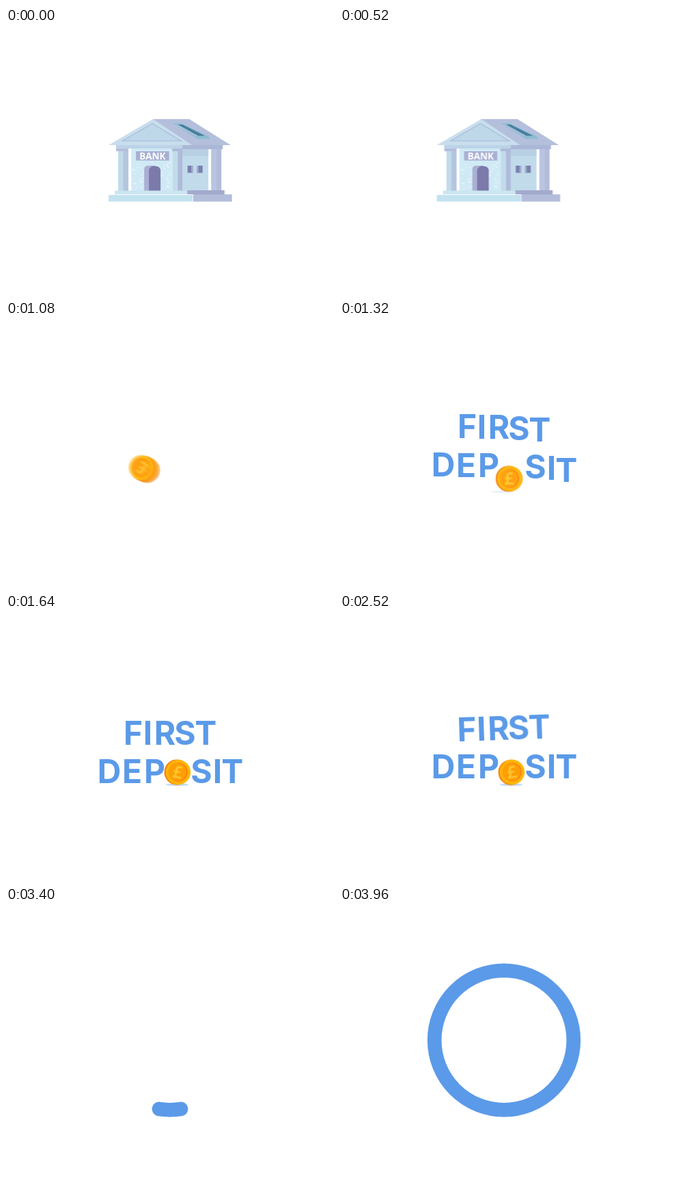
Animation of 480x387 px, one loop 4400 ms. Source, as an HTML page:

```html
<!DOCTYPE html>
<html lang="en">
<head>
<meta charset="utf-8">
<title>First deposit</title>
<style>
html, body { margin: 0; width: 100%; height: 100%; overflow: hidden; background: #fff; }
svg { display: block; width: 100%; height: 100%; }

/* One shared 4400 ms loop: 1% = 44 ms */
.bank, .cx, .cy, .spin, .trail, .solid, .letter, .line, .shadow, .ring {
  animation: 4400ms linear var(--lag, 0ms) infinite both;
}
.bank { animation-name: bank; }
.cx { animation-name: coin-x; }
.cy { animation-name: coin-y; }
.spin { animation-name: coin-spin; }
.trail { animation-name: trail; }
.solid { animation-name: solid; }
.letter { animation-name: rise; }
.line { animation-name: leave; transform-origin: 240px 190px; }
.tilt { --tilt: -2deg; }
.shadow { animation-name: shadow; }
.ring { animation-name: ring; }

.letter {
  font: 700 48px Inter, "Open Sans", sans-serif;
  text-anchor: middle;
  fill: #5b9ae8;
}
.sign { font: 700 13.6px "Open Sans", "Noto Sans", sans-serif; text-anchor: middle; fill: #fff; }
.pound { font: 700 25px "Noto Sans", "Open Sans", sans-serif; text-anchor: middle; }

@keyframes bank {
  0%, 10% { transform: none; animation-timing-function: ease-in-out; }
  16.36% { transform: translateX(-49px); animation-timing-function: cubic-bezier(.5, 0, .85, .5); }
  21.1%, 100% { transform: translateX(335px); }
}
@keyframes coin-x {
  0%, 17.27% { transform: translateX(-30px); animation-timing-function: cubic-bezier(.33, 1, .68, 1); }
  33.64%, 68.18% { transform: translateX(251px); animation-timing-function: ease-in-out; }
  73.64%, 100% { transform: translateX(240px); }
}
@keyframes coin-y {
  0%, 17.27% { transform: translateY(106px); animation-timing-function: cubic-bezier(.27, 1, .57, 1); }
  33.64%, 61.82% { transform: translateY(231px); animation-timing-function: ease-out; }
  68.18% { transform: translateY(224.5px); animation-timing-function: cubic-bezier(.33, 0, .67, .33); }
  73.64%, 100% { transform: translateY(296.5px); }
}
@keyframes coin-spin {
  0%, 17.27% { transform: rotate(-850deg); animation-timing-function: cubic-bezier(.33, 1, .68, 1); }
  33.64%, 50% { transform: rotate(0deg); animation-timing-function: ease-in-out; }
  57.27% { transform: rotate(-18deg); animation-timing-function: ease-in-out; }
  64%, 68.18% { transform: rotate(0deg) scale(1); animation-timing-function: ease-in; }
  72.7% { opacity: 1; }
  73.64%, 100% { transform: rotate(0deg) scale(.55); opacity: 0; }
}
/* Motion blur: faint copies while fast, one solid shape otherwise */
@keyframes trail {
  0%, 17% { opacity: 0; }
  17.01%, 31% { opacity: .38; }
  31.01%, 100% { opacity: 0; }
}
@keyframes solid {
  0%, 30.8% { opacity: 0; }
  30.81%, 100% { opacity: 1; }
}
@keyframes rise {
  0%, 25% { transform: translateY(62px); animation-timing-function: cubic-bezier(.3, .6, .5, 1); }
  30% { transform: translateY(-20px); animation-timing-function: ease-in-out; }
  33.4% { transform: translateY(1px); animation-timing-function: ease-in-out; }
  35%, 100% { transform: none; }
}
@keyframes leave {
  0%, 50% { transform: translateY(0) rotate(0deg); animation-timing-function: ease-in; }
  57.27% { transform: translateY(-7px) rotate(var(--tilt, 0deg)); animation-timing-function: ease-out; }
  59.77% { transform: translateY(-18px) rotate(var(--tilt, 0deg)); animation-timing-function: ease-in; }
  65%, 100% { transform: translateY(64px) rotate(0deg); }
}
@keyframes shadow {
  0%, 29% { opacity: 0; transform: translateX(-20px); animation-timing-function: ease-out; }
  33.64%, 61.82% { opacity: 1; transform: none; }
  65.5%, 100% { opacity: 0; transform: none; }
}
@keyframes ring {
  0%, 73.1% { opacity: 0; stroke-dashoffset: 99.9; }
  73.64% { opacity: 1; stroke-dashoffset: 99.9; animation-timing-function: cubic-bezier(.333, 0, .667, .333); }
  90%, 100% { opacity: 1; stroke-dashoffset: 0; }
}
</style>
</head>
<body>
<svg viewBox="0 0 480 387" preserveAspectRatio="none">
  <defs>
    <g id="coin">
      <circle cx="-.9" r="18.6" fill="#f58210"/>
      <circle cx="1" cy=".2" r="18.2" fill="#ffb508"/>
      <circle cx="1" r="13.8" fill="#f47f0c"/>
      <circle cx=".2" cy="-.3" r="13.1" fill="#ff9d05"/>
      <text class="pound" y="9" transform="rotate(10)" fill="#ffc32a">£</text>
    </g>
    <clipPath id="top"><path d="M120 120H360V193H120z"/></clipPath>
    <clipPath id="low"><path d="M120 180H360V249H120z"/></clipPath>

    <g id="house" transform="translate(-.8 0)">
      <!-- walls and columns -->
      <path fill="#d0eaf5" d="M184 176H248V238H184z"/>
      <path fill="#c1dbeb" d="M258 176H297V238H258z"/>
      <path fill="#b9cfe4" d="M258 176H297V187H258z"/>
      <path fill="#b3bfdc" d="M162 171H180V180H162z"/>
      <path fill="#c2dbea" d="M165 180H172V238H165z"/>
      <path fill="#b3c6df" d="M172 180H180V238H172z"/>
      <path fill="#c2dbea" d="M245 180H252V238H245z"/>
      <path fill="#aebbd9" d="M244 171H259V180H244zM252 180H259V238H252z"/>
      <path fill="#bac4e0" d="M301 177H308V238H301z"/>
      <path fill="#b1bddb" d="M308 177H316V238H308z"/>
      <g id="specks" fill="#fff"></g>
      <!-- beams and roof -->
      <path fill="#bdd3e7" d="M162 171H259V176H162z"/>
      <path fill="#aab7d7" d="M259 171H318V177H259z"/>
      <path fill="#b4bfdc" d="M215 133H269L329.500 171H258z"/>
      <path fill="#c8deed" d="M151 171L216 133L273 171z"/>
      <path fill="#bfd8e9" stroke="#a9bcd9" stroke-width="1.2" d="M171 165L215 139.500L257 165z"/>
      <path fill="#8dbdd3" d="M245 139H257L298.500 159V162H281z"/>
      <path fill="#497e9e" d="M252 141H259L292 157.500H282z"/>
      <path fill="#a9c3dc" d="M248 140.500L252 141L282 158L278 158z"/>
      <!-- sign, door, windows -->
      <path fill="#a8b0d2" d="M191 180H239.500V193.500H191z"/>
      <text class="sign" x="215.300" y="191.600">BANK</text>
      <path fill="#a9b0d3" d="M203 238V206Q203 201 209 201H219V238z"/>
      <path fill="#7b7aaa" d="M210 238V209Q210 201.500 218.500 201.500Q227 201.500 227 209V238z"/>
      <path fill="#7a80ae" d="M266.500 201H273.500V211.500H266.500zM280 201H288.500V211.500H280z"/>
      <path fill="#a3afd0" d="M272 201H275V211.500H272zM280 201H282.500V211.500H280z"/>
      <!-- steps -->
      <path fill="#cbe5f1" d="M160 237.500H266V243H160z"/>
      <path fill="#a3a9cc" d="M266 237H320.500V243H266z"/>
      <path fill="#c3e2ef" d="M151 243.500H274.500V253.500H151z"/>
      <path fill="#b3bddb" d="M274.500 243H331.500V253.500H274.500z"/>
      <path fill="none" stroke="#fff" stroke-width=".7" d="M151 243.300H274.300V253.500"/>
    </g>
  </defs>

  <g class="bank"><use href="#house"/></g>

  <ellipse class="shadow" cx="250.500" cy="249.300" rx="17" ry="1.600" fill="#b9d7f3"/>
  <g clip-path="url(#top)"><g class="line tilt" id="first"></g></g>
  <g clip-path="url(#low)"><g class="line" id="deposit"></g></g>

  <g class="solid"><g class="cx"><g class="cy"><g class="spin"><use href="#coin"/></g></g></g></g>

  <g fill="none" stroke="#5b9ae8" stroke-width="20.700" stroke-linecap="round" stroke-dasharray="100 200">
    <path class="ring" pathLength="100" d="M240 296.250A101.750 101.750 0 0 1 240 92.750"/>
    <path class="ring" pathLength="100" d="M240 296.250A101.750 101.750 0 0 0 240 92.750"/>
  </g>
</svg>
<script>
const NS = 'http://www.w3.org/2000/svg';
const stage = document.querySelector('svg');

function add(parent, tag, attrs, text = '') {
  const el = document.createElementNS(NS, tag);
  for (const key in attrs) el.setAttribute(key, attrs[key]);
  el.textContent = text;
  parent.append(el);
  return el;
}

function setWord(id, word, centers, y) {
  const line = document.getElementById(id);
  [...word].forEach((ch, i) => add(line, 'text', {
    class: 'letter', x: centers[i], y, style: `--lag: ${i * 16}ms`
  }, ch));
}

// Copies of a moving part, spread over one shutter time
function blur(selector, lags) {
  const part = document.querySelector(selector);
  for (const lag of lags) {
    add(stage, 'g', { class: 'trail', style: `--lag: ${lag}ms` }).append(part.cloneNode(true));
  }
}

setWord('first', 'FIRST', [186, 207.5, 232.5, 262, 292.3], 191.3);
setWord('deposit', 'DEPSIT', [151, 184.5, 217.5, 286, 309.5, 331.3], 247.3);
blur('.bank', [-10, 10]);
blur('.cx', [-12, -8, -4, 0, 4, 8, 12]);

// Stone texture on the front wall
const specks = document.getElementById('specks');
let seed = 7;
const rand = () => (seed = seed * 16807 % 2147483647) / 2147483647;
for (let i = 0; i < 75; i++) {
  add(specks, 'rect', {
    x: 185 + rand() * 58, y: 195 + rand() * 41, width: 1 + rand(), height: 1
  });
}
</script>
</body>
</html>
```
